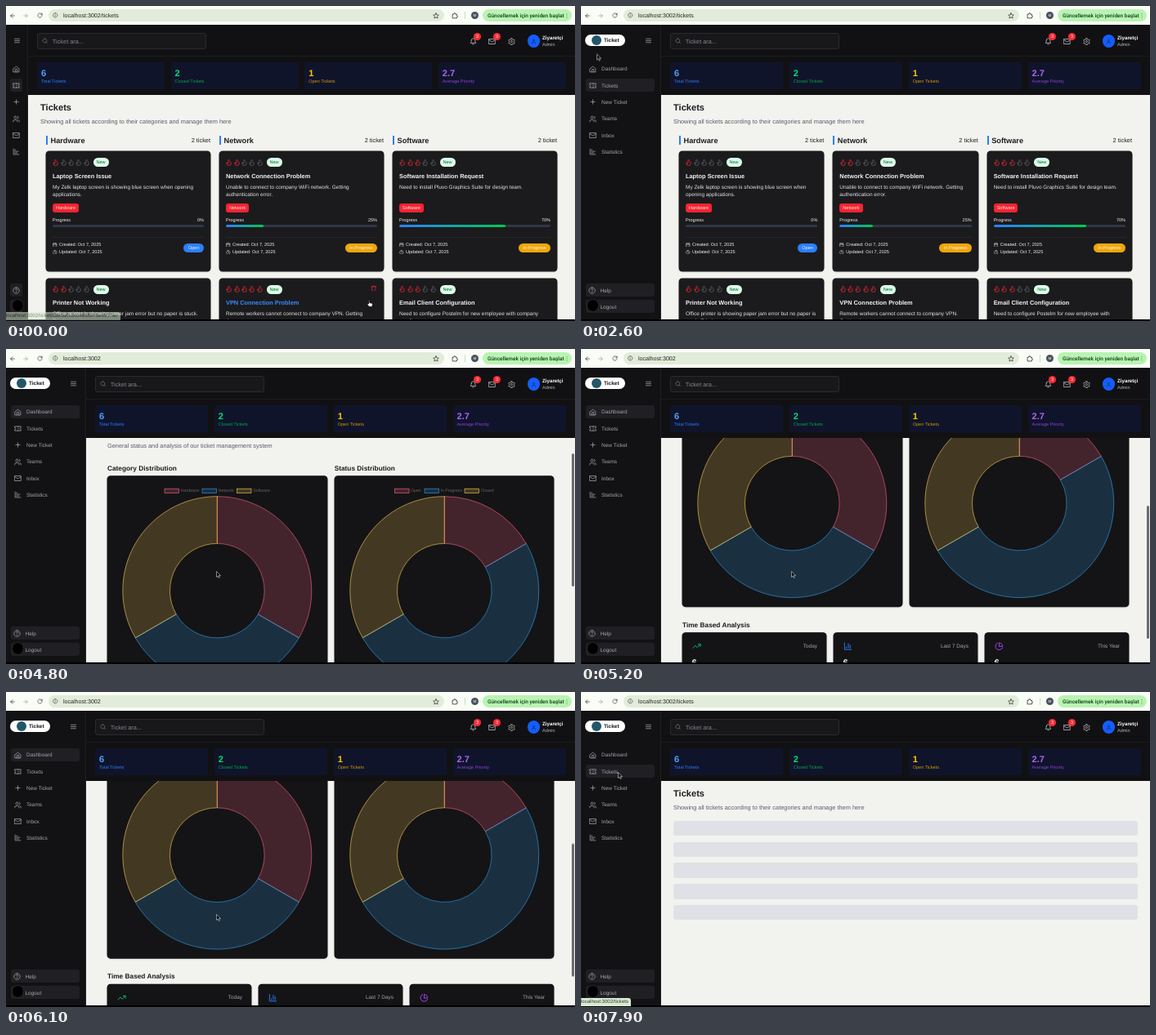
An HTML page for the animation above (8000 ms loop, 696 by 386 pixels).

```html
<!DOCTYPE html>
<html lang="en">
<head>
<meta charset="utf-8">
<title>Ticket dashboard</title>
<style>
@property --open { syntax: "<number>"; inherits: true; initial-value: 0; }
@property --scroll { syntax: "<number>"; inherits: true; initial-value: 0; }

html, body { margin: 0; width: 100%; height: 100%; overflow: hidden; background: #000; }
#stage {
  --side: calc(27px + 71px * var(--open));
  position: relative; width: 696px; height: 386px; overflow: hidden; background: #000;
  font: 6.46px/10px "Liberation Sans", Arial, sans-serif; color: #fff;
  text-rendering: geometricPrecision;
  animation: open 8s infinite, scroll 8s infinite;
}
#stage div, #stage svg, .t { position: absolute; box-sizing: border-box; }
.t { white-space: nowrap; }
.b { font-weight: 700; }
.icon { fill: none; stroke: currentColor; stroke-width: 2; stroke-linecap: round; stroke-linejoin: round; }
.dot { border-radius: 50%; }

#browser { left: 0; top: 0; width: 696px; height: 23px; background: #fafdf6; color: #222; }
.address { left: 52px; top: 4px; width: 484px; height: 15px; border-radius: 8px; background: #e2ecda; }
.update { left: 583px; top: 4px; width: 109px; height: 15px; border-radius: 8px; background: #b8f4b2; }
.divider { left: 561px; top: 7px; width: 1px; height: 9px; background: #c6dfc0; }

#header { left: var(--side); top: 23px; right: 0; height: 86px; background: #111113; }
.line { left: 0; right: 0; top: 38px; height: 1px; background: #1b1b1e; }
.search { left: 11px; top: 10px; width: 207px; height: 20px; border: 1px solid #2a2a2f; border-radius: 3px; background: #18181b; color: #85858d; }
.stats { left: 11px; right: 11px; top: 46px; height: 33px; display: grid; grid-template-columns: repeat(4, 1fr); gap: 7.4px; }
#stage .stats > div { position: relative; border-radius: 3px; background: #10142a; }

#side { left: 0; top: 23px; width: var(--side); height: 361px; overflow: hidden; background: #121214; border-right: 1px solid #1f1f22; color: #a5a5ad; }
.row { left: calc(4.5px + 1.5px * var(--open)); width: calc(15px + 69px * var(--open)); height: 16px; border-radius: 3px; background: #202024; }
.wide { opacity: var(--open); }
.logo { left: 5px; top: 12px; width: 49px; height: 14px; border-radius: 7px; background: #fff; color: #111; }
.round { left: 6.5px; top: 336px; width: 15.5px; height: 15.5px; background: #000; border: 1px solid #2c2c30; }

#main { left: var(--side); top: 109px; right: 0; height: 275px; overflow: hidden; background: #f2f3ef; color: #1d1d21; }
.page { inset: 1px 0 0; }
.muted { color: #565b68; }
.columns { left: 22px; right: 22px; top: 0; bottom: 0; display: grid; grid-template-columns: repeat(3, 1fr); gap: 11px; }
#stage .columns > div { position: relative; }
.mark { left: 0; top: 49px; width: 2px; height: 11px; background: #2b7fff; }
.card, .panel { border-radius: 4px; background: var(--fill); box-shadow: 0 0 0 .5px var(--fill), 0 1px 2px #0003; }
.card { --fill: #1b1b1d; left: 0; right: 0; height: 147px; color: #f4f4f5; }
.panel { --fill: #141416; color: #fff; }
.pill { height: 11px; line-height: 12px; padding: 0 4px; border-radius: 6px; font-size: 5.54px; white-space: nowrap; }
.desc { left: 8px; right: 8px; top: 39.6px; line-height: 9.2px; color: #e4e4e7; }
.bar { left: 8px; right: 8px; top: 89.5px; height: 3.5px; border-radius: 2px; background: #2f3644; overflow: hidden; }
.bar div { left: 0; height: 100%; border-radius: 2px; background: linear-gradient(90deg, #2b7fff, #00c951); }
.rule { left: 8px; right: 8px; top: 105px; height: 1px; background: #27272b; }
.ghost { left: 15px; right: 15px; height: 18.5px; border-radius: 3px; background: #e0e1e6; }

#dash { inset: 0; transform: translateY(calc(var(--scroll) * -1px)); }
.thumb {
  right: 1px; top: 1px; width: 3px; height: 163px; border-radius: 2px; background: #6b6b6b;
  transform: translateY(calc(var(--scroll) * .598px)); animation: thumb 8s infinite;
}

.bubble { left: -1px; top: 375px; height: 10px; padding: 0 3px 0 1px; font-size: 6.07px; white-space: nowrap; border-radius: 0 3px 0 0; background: #d9ebd0; color: #333; }
#cursor { left: 0; top: 0; animation: move 8s ease-in-out infinite; }

.tickets { animation: tickets 8s step-end infinite; }
.dash { animation: dash 8s step-end infinite; }
.away { animation: away 8s step-end infinite; }
.loading { animation: loading 8s step-end infinite; }
.hover { animation: hover 8s step-end infinite; }
.hot { animation: hot 8s step-end infinite; }
.arrow { animation: arrow 8s step-end infinite; }
.card-link { animation: card-link 8s infinite linear; }
.home-link { animation: home-link 8s step-end infinite; }
.list-link { animation: list-link 8s step-end infinite; }

@keyframes open { 0%, 20% { --open: 0; } 24%, 100% { --open: 1; } }
@keyframes scroll {
  0%, 57% { --scroll: 0; animation-timing-function: ease-in; }
  60% { --scroll: 28; animation-timing-function: ease-out; }
  70%, 73.5% { --scroll: 184.5; animation-timing-function: ease-in-out; }
  80.5%, 100% { --scroll: 0; }
}
@keyframes thumb { 0%, 57% { opacity: 0; } 58%, 86% { opacity: 1; } 89%, 100% { opacity: 0; } }
@keyframes move {
  0%, 1.2% { transform: translate(444px, 361px); }
  16%, 28% { transform: translate(13px, 50px); }
  32.5% { transform: translate(19px, 58.5px); }
  35.5%, 47% { transform: translate(34px, 74px); }
  55%, 84% { transform: translate(257px, 272px); }
  92.5%, 100% { transform: translate(45px, 98px); }
}
@keyframes tickets { 0% { opacity: 1; } 38.75% { opacity: 0; } }
@keyframes dash { 0% { opacity: 0; } 38.75% { opacity: 1; } 97.5% { opacity: 0; } }
@keyframes away { 0% { opacity: 1; } 38.75% { opacity: 0; } 97.5% { opacity: 1; } }
@keyframes loading { 0% { opacity: 0; } 97.5% { opacity: 1; } }
@keyframes hover { 0% { opacity: 1; } 3.75% { opacity: 0; } }
@keyframes hot { 0% { color: #3b8bff; } 3.75% { color: #f4f4f5; } }
@keyframes arrow { 0% { opacity: 0; } 3.75% { opacity: 1; } }
@keyframes card-link { 0% { opacity: .55; } 2.5%, 100% { opacity: 0; } }
@keyframes home-link { 0% { opacity: 0; } 35% { opacity: 1; } 53.75% { opacity: 0; } }
@keyframes list-link { 0% { opacity: 0; } 95% { opacity: 1; } }
</style>
</head>
<body>
<div id="stage"></div>
<script>
const ring = 'M12 2a10 10 0 1 0 .01 0';
const paths = {
  home: 'M3 10l9-7 9 7v11H3zM9 21v-9h6v9',
  ticket: 'M2 9a3 3 0 0 1 0 6v4h20v-4a3 3 0 0 1 0-6V5H2zM13 5v2M13 17v2M13 11v2',
  plus: 'M5 12h14M12 5v14',
  users: 'M16 21v-2a4 4 0 0 0-4-4H6a4 4 0 0 0-4 4v2M9 3a4 4 0 1 0 .01 0M22 21v-2a4 4 0 0 0-3-3.9M16 3.1a4 4 0 0 1 0 7.8',
  mail: 'M2 4h20v16H2zM22 7l-10 6L2 7',
  chart: 'M3 3v18h18M7 16h8M7 11h12M7 6h3',
  help: ring + 'M9 9a3 3 0 0 1 6 1c0 2-3 2-3 4M12 17h.01',
  menu: 'M4 6h16M4 12h16M4 18h16',
  search: 'M11 3a8 8 0 1 0 .01 0M21 21l-4.3-4.3',
  bell: 'M6 8a6 6 0 0 1 12 0c0 7 3 9 3 9H3s3-2 3-9M10 21h4',
  gear: 'M10 2h4l.6 3 2.6 1.5 2.9-1 2 3.4-2.3 2v3l2.3 2-2 3.4-2.9-1-2.6 1.5-.6 3h-4l-.6-3-2.6-1.5-2.9 1-2-3.4 2.3-2v-3l-2.3-2 2-3.4 2.9 1L9.4 5zM12 9a3 3 0 1 0 .01 0',
  user: 'M12 4a4 4 0 1 0 .01 0M5 21v-1a5 5 0 0 1 5-5h4a5 5 0 0 1 5 5v1',
  flame: 'M8.5 14.5A2.5 2.5 0 0 0 11 12c0-1.4-.5-2-1-3-1-2.1-.2-4 2-6 .5 2.5 2 4.9 4 6.5s3 3.5 3 5.5a7 7 0 1 1-14 0c0-1.2.4-2.3 1-3a2.5 2.5 0 0 0 2.5 2.5z',
  calendar: 'M3 4h18v18H3zM16 2v4M8 2v4M3 10h18',
  clock: ring + 'M12 6v6l4 2',
  trash: 'M3 6h18M19 6v14a2 2 0 0 1-2 2H7a2 2 0 0 1-2-2V6M8 6V4h8v2',
  trend: 'M22 7l-8.5 8.5-5-5L2 17M16 7h6v6',
  bars: 'M3 3v18h18M18 17V9M13 17V5M8 17v-3',
  pie: 'M21 12A9 9 0 0 0 12 3v9zM21.2 15.9A10 10 0 1 1 8 2.8',
  back: 'M19 12H5M12 19l-7-7 7-7',
  forward: 'M5 12h14M12 5l7 7-7 7',
  reload: 'M21 12a9 9 0 1 1-3-6.7L21 8M21 3v5h-5',
  info: ring + 'M12 16v-4M12 8h.01',
  star: 'M12 2l3 6.5 7 .8-5.2 4.8 1.5 7L12 17.5 5.7 21l1.5-7L2 9.3l7-.8z',
  puzzle: 'M4 8h4V6a2 2 0 0 1 4 0v2h5v5h1a2 2 0 0 1 0 4h-1v4H4z',
  dots: 'M12 5h.01M12 12h.01M12 19h.01'
};
const px = v => typeof v === 'number' ? v + 'px' : v;
// Icons and dots are placed by their centre, text by one edge and its middle line.
const icon = (name, x, y, size = 8, color = 'inherit') =>
  `<svg class="icon" viewBox="0 0 24 24" width="${size}" height="${size}" style="left:calc(${px(x)} - ${size / 2}px);top:${y - size / 2}px;color:${color}"><path d="${paths[name]}"/></svg>`;
const label = (edge, x, y, size, str, cls, color) =>
  `<span class="t ${cls}" style="${edge}:${x}px;top:${y - 4.4}px;font-size:${size}px${color ? ';color:' + color : ''}">${str}</span>`;
const text = (x, y, size, str, cls = '', color = '') => label('left', x, y, size, str, cls, color);
const textRight = (x, y, size, str, color = '') => label('right', x, y, size, str, '', color);
const dot = (x, y, r, color) =>
  `<div class="dot" style="left:${x - r}px;top:${y - r}px;width:${2 * r}px;height:${2 * r}px;background:${color}"></div>`;
const box = (cls, style, inner = '') => `<div class="${cls}" style="${style}">${inner}</div>`;

const browser = `<div id="browser"><div class="address"></div><div class="update"></div><div class="divider"></div>
  ${icon('back', 7.5, 11.5)}${icon('forward', 24, 11.5, 8, '#999')}${icon('reload', 41, 11.5, 7)}${icon('info', 60.5, 11.5, 6.5)}
  ${text(70, 11.5, 7.1, 'localhost:3002<span class="away">/tickets</span>')}
  ${icon('star', 525.5, 11.5, 8)}${icon('puzzle', 549, 11, 9)}${dot(573.5, 11.5, 4.7, '#47525c')}
  ${text(571.6, 11.5, 4.6, 'M', '', '#fff')}
  <span class="t" style="left:589px;top:6.5px;font:500 6.5px/10px Roboto,sans-serif;color:#123d17">Güncellemek için yeniden başlat</span>
  ${icon('dots', 686, 11.5, 8)}</div>`;

const stats = [
  ['6', 'Total Tickets', '#51a2ff', '#2b7fff'],
  ['2', 'Closed Tickets', '#05df72', '#00a651'],
  ['1', 'Open Tickets', '#fdc700', '#d09a08'],
  ['2.7', 'Average Priority', '#a866f5', '#8a42dd']
].map(([n, name, bright, dim]) =>
  `<div>${text(5, 13, 11.08, n, 'b', bright)}${text(5, 23.7, 5.54, name, '', dim)}</div>`).join('');

const badge = x => dot(x, 37.5, 4.6, '#fb2c36') + text(x - 1.5, 37.3, 5.5, '3');
const header = `<div id="header"><div class="line"></div>
  <div class="search">${icon('search', 8.5, 9, 7.4)}${text(17.8, 9, 7.39, 'Ticket ara...')}</div>
  <div class="stats">${stats}</div></div>
  ${icon('bell', 571, 43, 9, '#c4c4ca')}${icon('mail', 594.5, 43, 9, '#c4c4ca')}${icon('gear', 618.5, 43, 9, '#c4c4ca')}
  ${badge(576.5)}${badge(600.5)}${dot(645.5, 43, 7.6, '#155dfc')}${icon('user', 645.5, 43, 7, '#0b2350')}
  ${text(656, 39, 6.2, 'Ziyaretçi', 'b')}${text(656, 47.3, 5.54, 'Admin', '', '#b5b5bc')}`;

const navItem = ([name, caption], y) =>
  icon(name, 'calc(12px + 2.5px * var(--open))', y, 9) + text(25, y + .5, 6.46, caption, 'wide');
const nav = [['home', 'Dashboard'], ['ticket', 'Tickets'], ['plus', 'New Ticket'], ['users', 'Teams'], ['mail', 'Inbox'], ['chart', 'Statistics']]
  .map((item, i) => navItem(item, 54.2 + i * 20.3)).join('');
const side = `<div id="side">
  <div class="logo wide">${dot(14, 7, 6, '#24566a')}${text(23, 7, 6.46, 'Ticket', 'b')}</div>
  ${icon('menu', 'calc(13px + 69px * var(--open))', 19, 9)}
  ${box('row dash', 'top:46px')}${box('row away', 'top:66.3px')}${box('row', 'top:317px')}${box('row', 'top:337px')}
  ${nav}${icon('help', 'calc(12px + 1px * var(--open))', 325.5, 9)}${text(23.5, 326, 6.46, 'Help', 'wide')}
  ${text(23.5, 346, 6.46, 'Logout', 'wide')}<div class="dot round"></div></div>`;

const groups = {
  Hardware: [
    ['Laptop Screen Issue', 'My Zelk laptop screen is showing blue screen when opening applications.', 1, 0],
    ['Printer Not Working', 'Office printer is showing paper jam error but no paper is stuck. Tried restarting.', 2, 0]],
  Network: [
    ['Network Connection Problem', 'Unable to connect to company WiFi network. Getting authentication error.', 2, 25],
    ['VPN Connection Problem', 'Remote workers cannot connect to company VPN. Getting timeout error.', 5, 0]],
  Software: [
    ['Software Installation Request', 'Need to install Pluvo Graphics Suite for design team.', 3, 70],
    ['Email Client Configuration', 'Need to configure Postelm for new employee with company email.', 3, 0]]
};
const card = (group, [title, desc, heat, done], i) => {
  const flames = [0, 1, 2, 3, 4].map(n => icon('flame', 12 + n * 9.3, 13.5, 9.23, n < heat ? '#fb2c36' : '#62666f')).join('');
  const hovered = title.startsWith('VPN');
  const trash = box('hover', 'inset:0', icon('trash', 'calc(100% - 12px)', 12, 7.5, '#fb2c36'));
  return box('card', `top:${68 + i * 155.5}px`, `${flames}
    ${box('pill', 'left:57.5px;top:8px;background:#dcfce7;color:#016630', 'New')}
    ${text(8, 30, 7.39, title, hovered ? 'b hot' : 'b')}${hovered ? trash : ''}<div class="desc">${desc}</div>
    ${box('pill', 'left:8px;top:64px;border-radius:3px;background:#fb2330', group)}
    ${text(8, 84, 5.54, 'Progress')}${textRight(8, 84, 5.54, done + '%')}
    <div class="bar">${box('', `width:${done}%`)}</div><div class="rule"></div>
    ${icon('calendar', 10.8, 114.3, 5.6)}${text(16, 114.3, 5.54, 'Created: Oct 7, 2025')}
    ${icon('clock', 10.8, 123.3, 5.6)}${text(16, 123.3, 5.54, 'Updated: Oct 7, 2025')}
    ${box('pill', `right:8px;top:113px;padding:0 5.5px;background:${done ? '#f0a60c' : '#2b7fff'}`, done ? 'In Progress' : 'Open')}`);
};
const columns = Object.entries(groups).map(([name, list]) =>
  `<div><div class="mark"></div>${text(5.5, 54.5, 9.23, name, 'b')}${textRight(0, 54.5, 7.39, '2 ticket')}
  ${list.map((item, i) => card(name, item, i)).join('')}</div>`).join('');
const listHead = text(15, 14.5, 11.08, 'Tickets', 'b') + text(15, 31.3, 7.39, 'Showing all tickets according to their categories and manage them here', 'muted');
const ghosts = [0, 1, 2, 3, 4].map(i => box('ghost', `top:${47.7 + i * 25.8}px`)).join('');

const hues = ['255,99,132', '54,162,235', '255,206,86'];
const donuts = [
  { title: 'Category Distribution', x: 26, counts: [2, 2, 2], keys: [['Hardware', 70], ['Network', 116], ['Software', 158.5]] },
  { title: 'Status Distribution', x: 303.7, counts: [1, 3, 2], keys: [['Open', 73.5], ['In Progress', 110], ['Closed', 159]] }
];
const tint = i => `fill="rgba(${hues[i]},.2)" stroke="rgb(${hues[i]})" stroke-width=".6"`;
const donutPanel = ({ title, x, keys }) => text(x, 63.3, 8.31, title, 'b') +
  box('panel', `left:${x}px;top:73.5px;width:268.5px;height:267.5px`,
    `<svg width="268.5" height="267.5" style="left:0;top:0">
      ${keys.map(([, kx], i) => `<rect x="${kx}" y="15.5" width="17.5" height="5.3" ${tint(i)}/>`).join('')}
      ${hues.map((_, i) => `<path class="slice" transform="translate(134.3 140.5)" ${tint(i)}/>`).join('')}</svg>
    ${keys.map(([name, kx]) => text(kx + 19.8, 18.3, 5.2, name, '', '#666')).join('')}`);
const periods = [['trend', 'Today', '#05c96a'], ['bars', 'Last 7 Days', '#2b7fff'], ['pie', 'This Year', '#ad46ff']]
  .map(([name, span, color], i) => box('panel', `left:${26 + i * 185}px;top:372.5px;width:176px;height:57px`,
    icon(name, 17, 16.5, 11, color) + textRight(11, 16.5, 6.46, span, '#a5a5ad') + text(11.5, 37, 11.08, '6', 'b'))).join('');

const main = `<div id="main">
  <div class="page tickets">${listHead}<div class="columns">${columns}</div></div>
  <div class="page loading">${listHead}${ghosts}</div>
  <div class="page dash"><div id="dash">
    ${text(26, 19, 13.85, 'Dashboard', 'b')}${text(26, 36.7, 7.39, 'General status and analysis of our ticket management system', 'muted')}
    ${donuts.map(donutPanel).join('')}${text(26, 362.2, 8.31, 'Time Based Analysis', 'b')}${periods}</div>
    <div class="thumb"></div></div></div>`;

const link = (cls, path) => `<div class="bubble ${cls}">localhost:3002${path}</div>`;
const cursor = `<div id="cursor">
  <svg class="arrow" width="8" height="10" viewBox="-.5 -.5 8 10"><path d="M0 0v7l1.6-1.5 1.1 2.5 1.2-.5-1.1-2.4H5z" fill="#000" stroke="#fff" stroke-width=".5"/></svg>
  <svg class="hover" style="left:-3px;top:-1px" width="9" height="10" viewBox="0 0 9 10"><path d="M2.5 5V1q.6-.9 1.2 0v2.7l3 .6q.8.3.7 1.2L6.8 8.5H3.2L.8 5.6q.5-1 1.7-.6z" fill="#fff" stroke="#000" stroke-width=".7"/></svg></div>`;

const stage = document.getElementById('stage');
stage.innerHTML = browser + header + main + side +
  link('card-link', '/ticket/68e5a0c2c04d85b76e9917ae') + link('home-link', '') + link('list-link', '/tickets') + cursor;

const slices = [...document.querySelectorAll('.slice')];
const point = (radius, turn) => {
  const a = turn * 2 * Math.PI;
  return `${radius * Math.sin(a)} ${-radius * Math.cos(a)}`;
};
const slicePath = (from, to) => {
  const outer = 115.5, inner = 57.8;
  return `M${point(outer, from)}A${outer} ${outer} 0 0 1 ${point(outer, to)}L${point(inner, to)}A${inner} ${inner} 0 0 0 ${point(inner, from)}z`;
};
const clock = stage.getAnimations()[0];

// Both rings sweep open from the top over one second.
function draw() {
  const time = (clock.currentTime || 0) % 8000;
  const p = Math.min(1, Math.max(0, (time - 3100) / 1000));
  const sweep = 1 - (1 - p) ** 4;
  donuts.forEach(({ counts }, d) => {
    let sum = 0;
    counts.forEach((n, i) => {
      slices[d * 3 + i].setAttribute('d', slicePath(sum / 6 * sweep, (sum + n) / 6 * sweep));
      sum += n;
    });
  });
  requestAnimationFrame(draw);
}
draw();
</script>
</body>
</html>
```
